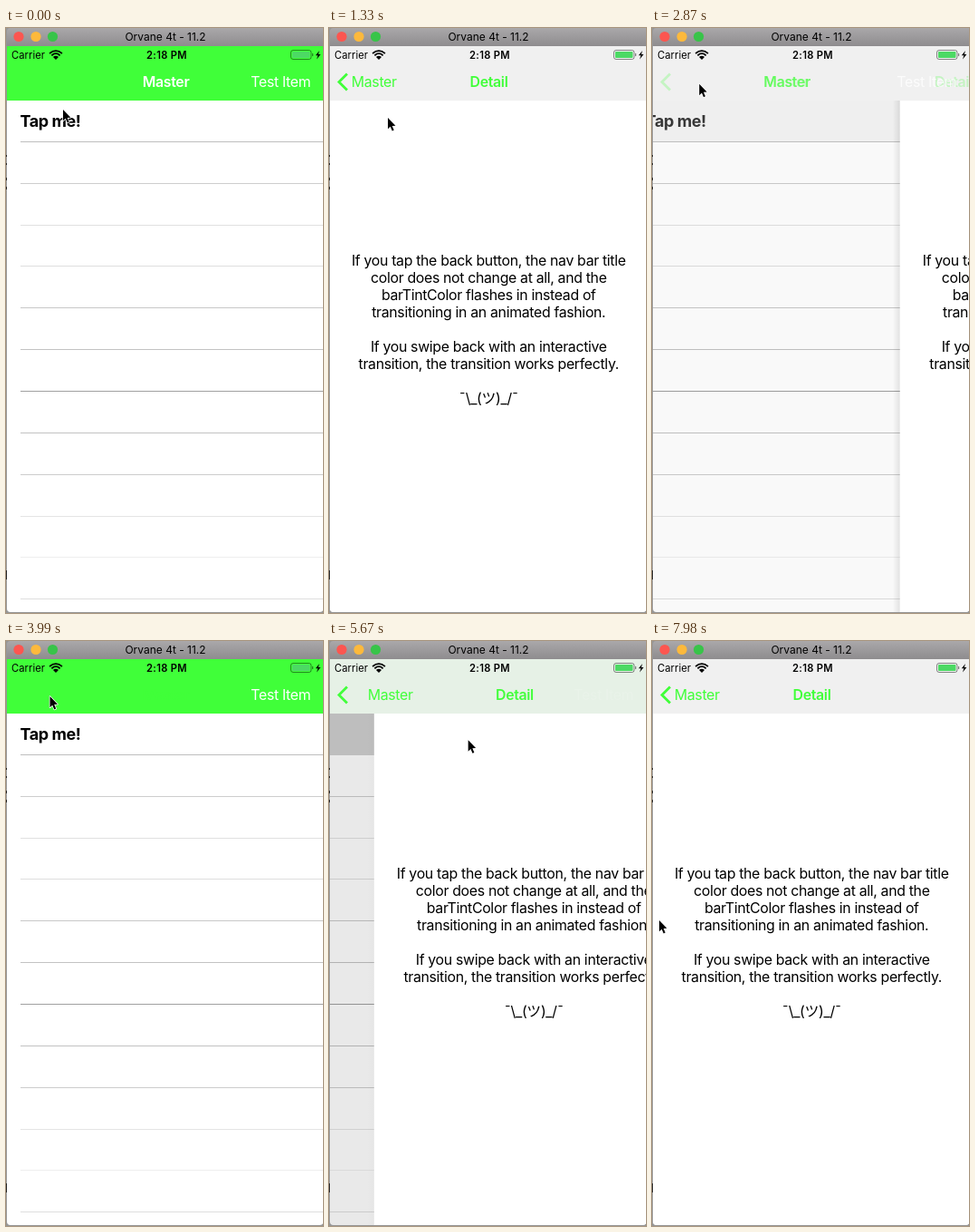
These frames come from a looping animation (350 by 645 pixels, 8000 ms). An HTML page with a canvas:

```html
<!DOCTYPE html>
<html lang="en">
<head>
<meta charset="utf-8">
<title>Navigation bar transition</title>
<style>
html, body { margin: 0; width: 100%; height: 100%; overflow: hidden; background: #fff; }
canvas { display: block; width: 350px; height: 645px; }
</style>
</head>
<body>
<canvas id="stage"></canvas>
<script>
const W = 350, H = 645, LOOP = 8000, STEP = 70;
const BAR_TOP = 20, BAR_BOTTOM = 80;
const GREEN = [64, 255, 57], LIGHT = [240, 240, 240], WHITE = [255, 255, 255];
const FONT = 'Inter, "Noto Sans CJK JP", "Noto Sans CJK", sans-serif';
const BODY = 15.87, TRACK = -0.33;

const canvas = document.getElementById('stage');
const ctx = canvas.getContext('2d');
const dpr = window.devicePixelRatio || 1;
canvas.width = W * dpr;
canvas.height = H * dpr;

const clamp = v => Math.max(0, Math.min(1, v));
const lerp = (a, b, k) => a + (b - a) * k;
const smooth = k => k * k * (3 - 2 * k);
const rgb = c => `rgb(${c.map(Math.round).join(',')})`;
const mix = (a, b, k) => rgb(a.map((v, i) => lerp(v, b[i], k)));

// Critically damped spring from 0 to 1.
function spring(ms) {
  if (ms <= 0) return 0;
  const x = 16 * ms / 1000;
  const p = 1 - (1 + x) * Math.exp(-x);
  return p > 0.996 ? 1 : p;
}

const PUSH_1 = 388, POP = 2690, POP_END = 3220, PUSH_2 = 5455;
const TOUCH_1 = 330, TOUCH_2 = 5390, BACK_DOWN = 2540;

// Cursor stops: time, x, y.
const CURSOR = [
  [0, 63, 90], [70, 63, 90], [280, 65, 99], [1330, 65, 99], [2240, 52.5, 60],
  [3360, 52, 63], [3500, 48.5, 61], [3990, 48.5, 61], [4760, 163, 101],
  [5600, 163, 101], [6090, -5.5, 252], [6510, -5.5, 252],
  [7280, 58, 263], [7910, 8, 308], [8000, 8, 308]
];

function cursorAt(t) {
  const i = CURSOR.findIndex(stop => stop[0] > t);
  const [t0, x0, y0] = CURSOR[i - 1], [t1, x1, y1] = CURSOR[i];
  const k = smooth((t - t0) / (t1 - t0));
  return [lerp(x0, x1, k), lerp(y0, y1, k)];
}

function stateAt(t) {
  let p, bar, cell;
  if (t < BACK_DOWN) {
    p = spring(t - PUSH_1);
    bar = clamp(p * 1.1);
    cell = t >= TOUCH_1 ? 1 : 0;
  } else if (t < 3990) {
    p = 1 - spring(t - POP);
    bar = t < POP_END ? 1 : 0;
    cell = p;
  } else {
    p = spring(t - PUSH_2);
    bar = clamp(p * 1.1);
    cell = t >= TOUCH_2 ? 1 : 0;
  }
  return {
    p, bar, cell,
    title: t < BACK_DOWN ? WHITE : GREEN,
    pressed: t >= BACK_DOWN && t < POP
  };
}

function text(str, x, y, { size = BODY, weight = 400, color = '#000', align = 'left', track = TRACK, alpha = 1 } = {}) {
  if (alpha <= 0) return;
  ctx.save();
  ctx.globalAlpha *= alpha;
  ctx.font = `${weight} ${size}px ${FONT}`;
  ctx.letterSpacing = track + 'px';
  ctx.textAlign = align;
  ctx.fillStyle = color;
  ctx.fillText(str, x, y);
  ctx.restore();
}

function rect(x, y, w, h, color) {
  ctx.fillStyle = color;
  ctx.fillRect(x, y, w, h);
}

function poly(points) {
  ctx.beginPath();
  points.forEach(([x, y]) => ctx.lineTo(x, y));
}

function circle(x, y, r, color) {
  ctx.beginPath();
  ctx.arc(x, y, r, 0, Math.PI * 2);
  ctx.fillStyle = color;
  ctx.fill();
}

function drawDesktop() {
  rect(0, 0, W, H, '#969696');
  [[140, 2], [149, 2], [165, 3], [175, 3], [598, 10]].forEach(([y, h]) => rect(0, y, 1, h, '#222'));
}

function drawTitleBar() {
  const g = ctx.createLinearGradient(0, 0, 0, 20);
  g.addColorStop(0, '#aaa8aa');
  g.addColorStop(1, '#8e8c8e');
  rect(0, 0, W, BAR_TOP, g);
  circle(14, 9.5, 5.6, '#fc5650');
  circle(33, 9.5, 5.6, '#fdb93c');
  circle(51.5, 9.5, 5.6, '#38c449');
  text('Orvane 4t - 11.2', 176, 14, { size: 12, align: 'center', track: 0 });
}

const SHADES = [190, 205, 225, 222, 200, 195, 160, 195, 205, 228, 238, 222];

function drawMaster({ p, cell }) {
  ctx.save();
  ctx.translate(-0.3 * W * p, 0);
  rect(0, BAR_BOTTOM, W * 1.3, H, '#fff');
  SHADES.forEach((v, i) => rect(16, Math.floor(125.45 + 45.84 * i), W * 1.3, 1, rgb([v, v, v])));
  ctx.globalAlpha = cell;
  rect(0, BAR_BOTTOM, W * 1.3, 46, '#d0d0d0');
  ctx.globalAlpha = 1;
  text('Tap me!', 15.6, 109, { size: 18, weight: 700, track: -0.45, color: mix([0, 0, 0], WHITE, cell) });
  ctx.restore();
  rect(0, BAR_BOTTOM, W, H, `rgba(0,0,0,${0.1 * p})`);
}

const LINES = [
  'If you tap the back button, the nav bar title',
  'color does not change at all, and the',
  'barTintColor flashes in instead of',
  'transitioning in an animated fashion.',
  '',
  'If you swipe back with an interactive',
  'transition, the transition works perfectly.',
  '',
  '¯\\_(ツ)_/¯'
];

function drawDetail(p) {
  if (p <= 0) return;
  const x = W * (1 - p);
  if (p < 1) {
    const g = ctx.createLinearGradient(x - 8, 0, x, 0);
    g.addColorStop(0, 'rgba(0,0,0,0)');
    g.addColorStop(1, `rgba(0,0,0,${0.12 * (1 - p)})`);
    rect(x - 8, BAR_BOTTOM, 8, H, g);
  }
  rect(x, BAR_BOTTOM, W, H, '#fff');
  LINES.forEach((line, i) => text(line, x + 176.3, 262 + 18.95 * i, { align: 'center' }));
}

function drawWifi() {
  ctx.save();
  poly([[55, 35], [47, 27], [47, 20], [63, 20], [63, 27]]);
  ctx.closePath();
  ctx.clip();
  ctx.strokeStyle = '#000';
  ctx.lineWidth = 1.8;
  [8.9, 5.8].forEach(r => {
    ctx.beginPath();
    ctx.arc(55, 34, r, Math.PI, Math.PI * 2);
    ctx.stroke();
  });
  circle(55, 34, 3.3, '#000');
  ctx.restore();
}

function drawStatus() {
  text('Carrier', 6, 33.5, { size: 11.2, track: 0.07 });
  drawWifi();
  text('2:18 PM', 177.5, 33.5, { size: 11.2, weight: 600, align: 'center', track: 0.3 });
  ctx.strokeStyle = 'rgba(0,0,0,.45)';
  ctx.lineWidth = 1;
  ctx.beginPath();
  ctx.roundRect(314.5, 24.5, 22.5, 10, 2.5);
  ctx.stroke();
  ctx.beginPath();
  ctx.roundRect(316, 26, 19.5, 7, 1);
  ctx.fillStyle = '#4cd964';
  ctx.fill();
  rect(338, 28, 1.2, 3, 'rgba(0,0,0,.45)');
  poly([[346, 25], [341.8, 30.2], [344.3, 30.2], [343, 34.5], [347.4, 28.9], [344.8, 28.9]]);
  ctx.fillStyle = '#000';
  ctx.fill();
}

function drawNavBar({ p, bar, title, pressed }) {
  const y = 65, green = rgb(GREEN), label = pressed ? 0.25 : 1;
  rect(0, BAR_TOP, W, BAR_BOTTOM - BAR_TOP, mix(GREEN, LIGHT, bar));
  drawStatus();

  const backX = 24.8 + 126 * (1 - p);
  text('Master', backX, y, { weight: 600, color: rgb(title), alpha: 1 - p * 1.25 });
  text('Master', backX, y, { color: green, alpha: clamp(p * 1.15) * label });
  text('Detail', 176.5 + 200 * (1 - p), y, { weight: 600, color: green, align: 'center', alpha: clamp(p * 1.15) });
  text('Test Item', 270.3, y, { color: '#fff', alpha: 1 - p });

  ctx.save();
  ctx.globalAlpha = clamp(p * 1.15) * label;
  ctx.strokeStyle = green;
  ctx.lineWidth = 2.8;
  poly([[20, 50.5], [11, 59.5], [20, 68.5]]);
  ctx.stroke();
  ctx.restore();
}

function drawCursor([x, y]) {
  ctx.save();
  ctx.translate(x, y);
  ctx.scale(0.92, 0.95);
  poly([[0, 0], [0, 13], [3, 10.2], [5.2, 15.2], [7.3, 14.3], [5.1, 9.4], [9.2, 9.2]]);
  ctx.closePath();
  ctx.lineJoin = 'round';
  ctx.lineWidth = 1.6;
  ctx.strokeStyle = '#fff';
  ctx.stroke();
  ctx.fillStyle = '#000';
  ctx.fill();
  ctx.restore();
}

function draw(t) {
  const state = stateAt(t);
  ctx.setTransform(dpr, 0, 0, dpr, 0, 0);
  drawDesktop();
  ctx.save();
  ctx.beginPath();
  ctx.roundRect(1, 0, W - 0.5, H - 1, [4, 0, 4, 4]);
  ctx.clip();
  drawMaster(state);
  drawDetail(state.p);
  drawNavBar(state);
  drawTitleBar();
  ctx.restore();
  drawCursor(cursorAt(t));
}

const start = performance.now();
function tick() {
  const t = (performance.now() - start) % LOOP;
  draw(Math.floor(t / STEP) * STEP);
  requestAnimationFrame(tick);
}
tick();
</script>
</body>
</html>
```
